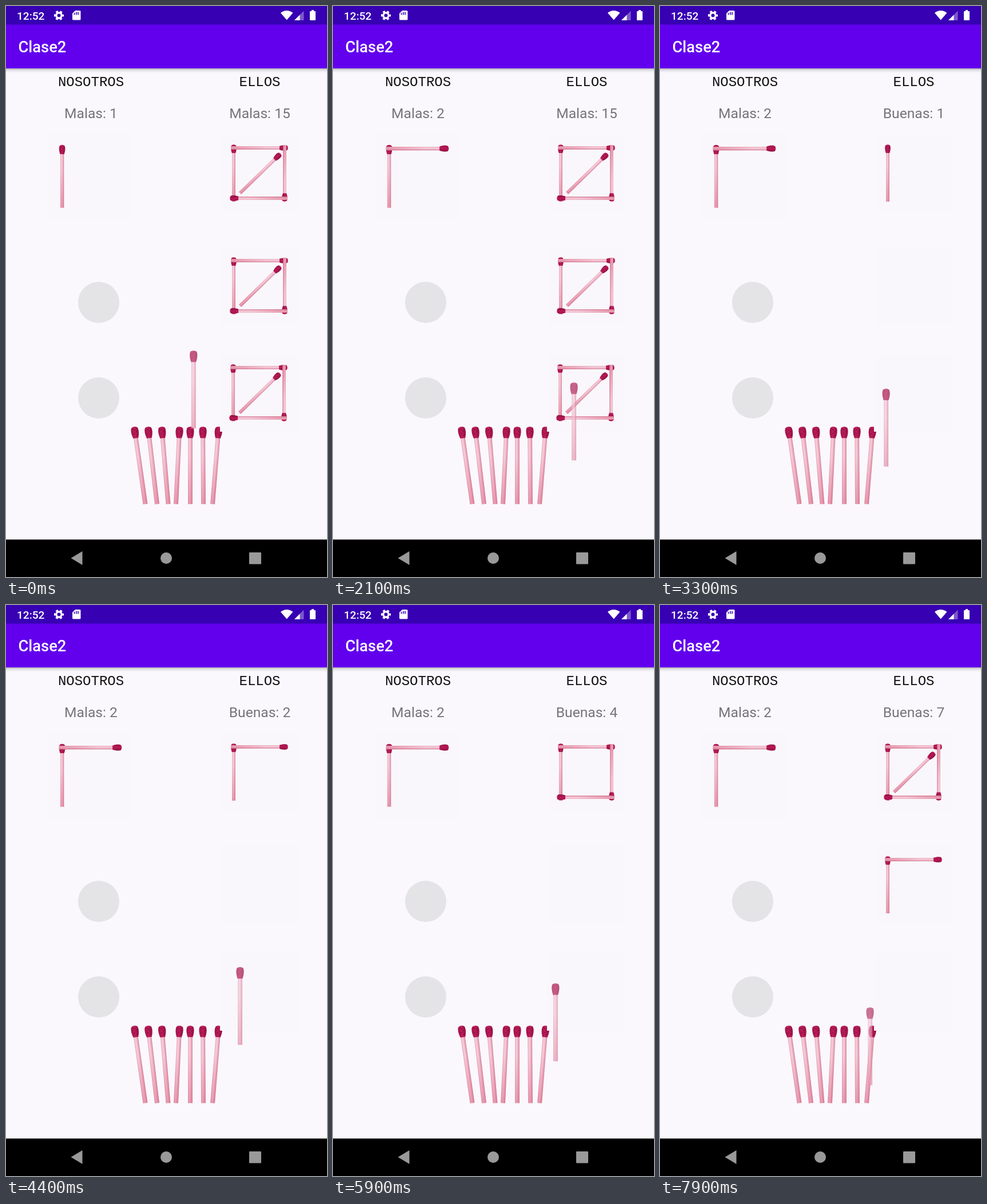
Animation, 561 px wide and 998 px high, one loop 8000 ms. Source, as an HTML page:

```html
<!DOCTYPE html>
<html lang="es">
<head>
<meta charset="utf-8">
<title>Clase2</title>
<style>
  html, body { margin: 0; width: 100%; height: 100%; overflow: hidden; background: #faf8fd; }
  svg { display: block; width: 100vw; height: 100vh; }
  text { font-family: Roboto, sans-serif; }
  .bar { fill: #fff; font-weight: 500; }
  .team { font: 24px "Liberation Mono", monospace; fill: #111; text-anchor: middle; }
  .score { font-size: 24.6px; fill: #757477; text-anchor: middle; }
</style>
</head>
<body>
<svg viewBox="0 0 561 998" preserveAspectRatio="none">
  <defs>
    <linearGradient id="wood">
      <stop offset="0" stop-color="#e9a9bd"/>
      <stop offset=".35" stop-color="#f7d0db"/>
      <stop offset=".65" stop-color="#f0b4c6"/>
      <stop offset="1" stop-color="#d4849f"/>
    </linearGradient>
    <linearGradient id="grain" x2="0" y2="1">
      <stop offset=".3" stop-color="#d5607f" stop-opacity="0"/>
      <stop offset="1" stop-color="#d5607f" stop-opacity=".45"/>
    </linearGradient>
    <linearGradient id="tip">
      <stop offset="0" stop-color="#9c1148"/>
      <stop offset=".45" stop-color="#bd1b5a"/>
      <stop offset="1" stop-color="#931043"/>
    </linearGradient>
    <linearGradient id="shade" x2="0" y2="1">
      <stop offset="0" stop-opacity=".3"/>
      <stop offset=".4" stop-opacity=".09"/>
      <stop offset="1" stop-opacity="0"/>
    </linearGradient>
    <g id="match">
      <rect x="-2.9" y="12" width="5.8" height="88" fill="url(#wood)"/>
      <rect x="-2.9" y="12" width="5.8" height="88" fill="url(#grain)"/>
      <path d="M-3.2 15C-5 10-5.5 4-3.8 1.4Q0-1 3.8 1.4C5.5 4 5 10 3.2 15Z" fill="url(#tip)"/>
      <path d="M-2 3.5l2.5 1M1 7l2-1M-2 10l2-1.5M1 12l1.5-1" stroke="#7f0c3a" stroke-width=".7"/>
    </g>
  </defs>

  <rect width="561" height="998" fill="#faf8fd"/>
  <rect y="109" width="561" height="8" fill="url(#shade)"/>
  <rect y="32" width="561" height="77" fill="#6200ee"/>
  <rect width="561" height="32.5" fill="#3700b3"/>
  <text class="bar" x="19" y="23.5" font-size="19.1">12:52</text>
  <text class="bar" x="21.5" y="81" font-size="27.3">Clase2</text>

  <g fill="#fff">
    <circle cx="92.5" cy="16.5" r="4.7" fill="none" stroke="#fff" stroke-width="3.4"/>
    <circle cx="92.5" cy="16.5" r="7.3" fill="none" stroke="#fff" stroke-width="2.6" stroke-dasharray="4 3.644" stroke-dashoffset="2"/>
    <path d="M121 8h8q1.5 0 1.5 1.5v13.500q0 1.500-1.500 1.500h-11.500q-1.500 0-1.500-1.500v-10z"/>
    <path d="M119.500 12v3.500M122.800 10.500v5M126 10.500v5" stroke="#3700b3" stroke-width="1.600"/>
    <path d="M480 12Q490.500 4 501.500 12L490.700 24.500Z"/>
    <path d="M520.500 8.500V25H504Z" opacity=".35"/>
    <path d="M513.500 15.500V25H504Z"/>
    <path d="M534 7h4v2h2q1 0 1 1v14q0 1-1 1h-8q-1 0-1-1v-14q0-1 1-1h2z"/>
  </g>

  <text class="team" x="148.5" y="140">NOSOTROS</text>
  <text class="team" x="443.5" y="140">ELLOS</text>
  <text class="score" id="oursText" x="148.5" y="196"></text>
  <text class="score" id="theirsText" x="443.5" y="196"></text>

  <circle cx="162" cy="518" r="36" fill="#e4e3e6"/>
  <circle cx="162" cy="685" r="36" fill="#e4e3e6"/>
  <g id="pile"></g>
  <g id="board"></g>
  <use id="dragged" href="#match"/>

  <rect y="932.500" width="561" height="66" fill="#000"/>
  <g fill="#999">
    <path d="M133.500 953v24L113.500 965Z"/>
    <circle cx="280" cy="965" r="10"/>
    <rect x="425" y="955" width="21" height="20.500" rx="1"/>
  </g>
</svg>
<script>
const LOOP = 8000, STEP = 100, LIFT = 400, RETURN = 300;
const HOME = { x: 300, y: 800 };
const MATCH_SCALE = 1.365;
const byId = id => document.getElementById(id);

function add(parent, tag, attrs) {
  const el = document.createElementNS("http://www.w3.org/2000/svg", tag);
  for (const name in attrs) el.setAttribute(name, attrs[name]);
  parent.appendChild(el);
  return el;
}

// A match from its head to the end of its stick.
function addMatch(parent, hx, hy, ex, ey) {
  const angle = Math.atan2(hx - ex, ey - hy) * 180 / Math.PI;
  const scale = Math.hypot(ex - hx, ey - hy) / 100;
  return add(parent, "use", {
    href: "#match",
    transform: `translate(${hx} ${hy}) rotate(${angle}) scale(${scale})`
  });
}

const TALLY = [
  [21, 16, 21, 116],
  [116, 22, 16, 22],
  [110, 116, 110, 17],
  [14, 110, 115, 110],
  [103, 32, 32, 101]
];

function addTally(x, y, scale) {
  const g = add(byId("board"), "g", { transform: `translate(${x} ${y}) scale(${scale})` });
  add(g, "rect", { x: -2, y: -1, width: 136, height: 135, fill: "#f9f7fb" });
  return TALLY.map(line => addMatch(g, ...line));
}

const PILE = [[224, 243.5], [248, 264], [272, 283.5], [303.5, 297], [322, 322], [344, 345], [372, 361]];
for (const [head, end] of PILE) addMatch(byId("pile"), head, 735, end, 870.5);

const ours = addTally(75, 225, 1.1);
const theirs = [[377, 226], [377, 423], [376, 610]].flatMap(([x, y]) => addTally(x, y, 1));

// Each drag: when and where the match is let go, and who scores.
const DRAGS = [
  { at: -50, x: 340, y: 613 },
  { at: 1350, x: 150, y: 690, team: "ours" },
  { at: 2030, x: 506, y: 674 },
  { at: 3250, x: 437, y: 709, team: "theirs" },
  { at: 4350, x: 457, y: 657, team: "theirs" },
  { at: 5050, x: 440, y: 690, team: "theirs" },
  { at: 5850, x: 428, y: 698, team: "theirs" },
  { at: 6450, x: 445, y: 685, team: "theirs" },
  { at: 7050, x: 440, y: 700, team: "theirs" },
  { at: 7800, x: 451, y: 735, team: "theirs" }
];

const smooth = u => u * u * (3 - 2 * u);
const easeOut = u => 1 - (1 - u) ** 2;

function drawDragged(t) {
  const el = byId("dragged");
  const drag = DRAGS.find(d => t >= d.at - LIFT && t < d.at + RETURN);
  el.style.display = drag ? "" : "none";
  if (!drag) return;
  const back = t < drag.at ? 0 : easeOut((t - drag.at) / RETURN);
  const reach = t < drag.at ? smooth((t - drag.at + LIFT) / LIFT) : 1 - back;
  const x = HOME.x + (drag.x - HOME.x) * reach;
  const y = HOME.y + (drag.y - HOME.y) * reach - 50 * MATCH_SCALE;
  el.setAttribute("transform", `translate(${x} ${y}) scale(${MATCH_SCALE})`);
  el.setAttribute("opacity", 0.85 - 0.45 * back);
}

function showCount(matches, count) {
  matches.forEach((m, i) => { m.style.display = i < count ? "" : "none"; });
}

function draw(t) {
  const scored = team => DRAGS.filter(d => d.team === team && d.at <= t).length;
  const good = scored("theirs"), bad = 1 + scored("ours");
  showCount(ours, bad);
  showCount(theirs, good || 15);
  byId("oursText").textContent = `Malas: ${bad}`;
  byId("theirsText").textContent = good ? `Buenas: ${good}` : "Malas: 15";
  drawDragged(t);
}

let start;
function tick(now) {
  start ??= now;
  const t = (now - start) % LOOP;
  draw(Math.floor(t / STEP) * STEP);
  requestAnimationFrame(tick);
}
draw(0);
requestAnimationFrame(tick);
</script>
</body>
</html>
```
